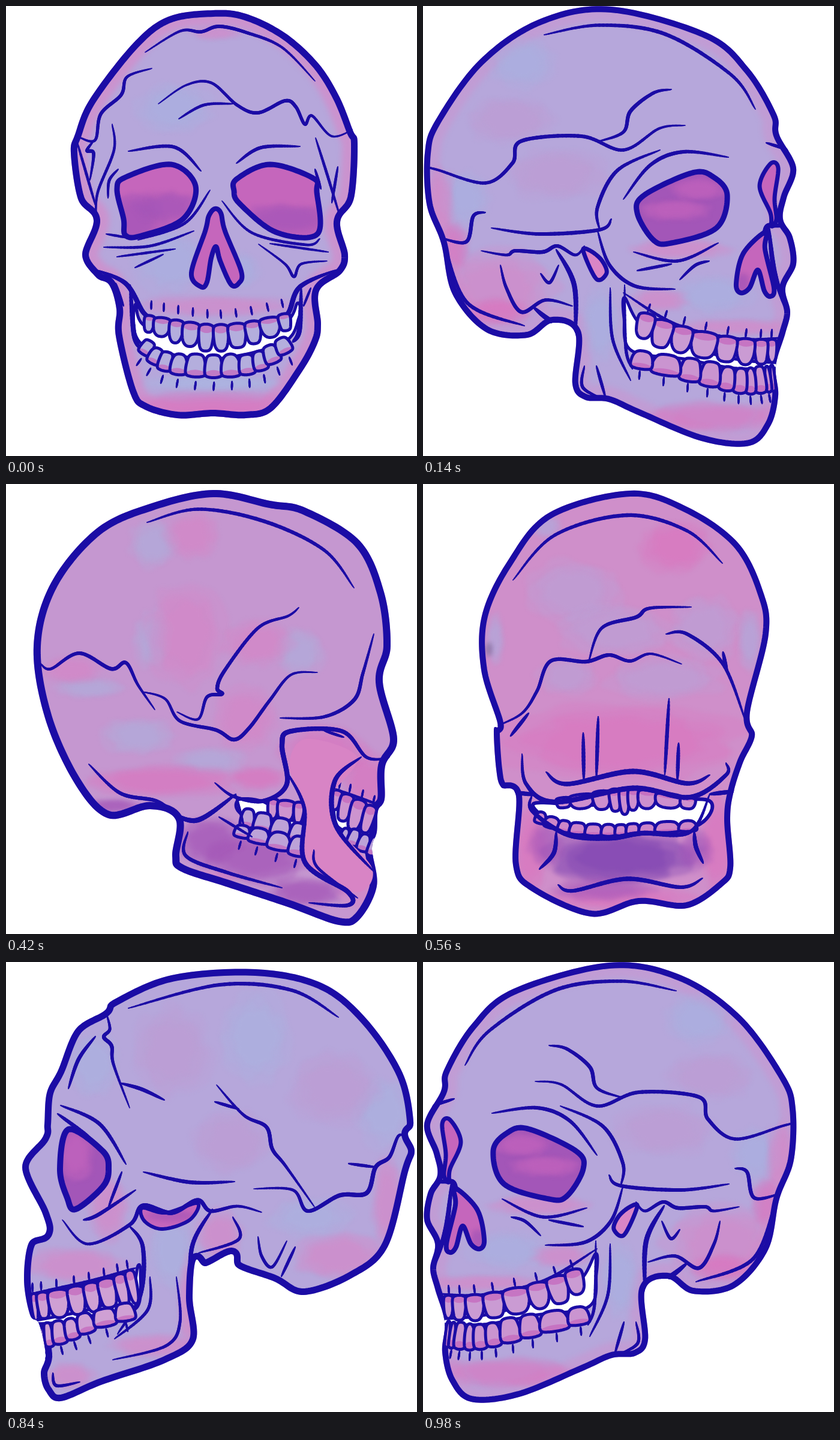
An HTML page with a canvas for the animation above (1120 ms loop, 685 by 750 pixels).

```html
<!DOCTYPE html>
<html>
<head>
<meta charset="utf-8">
<title>Turning skull</title>
<style>
html, body { margin: 0; width: 100%; height: 100%; overflow: hidden; background: #fff; }
canvas { display: block; }
</style>
</head>
<body>
<canvas id="stage" width="685" height="750"></canvas>
<script>
const W = 685, H = 750, STEP = 140;
const INK = '#1b0ca5', BLUE = '#a5b9e3', LILAC = '#b6a7db', MAUVE = '#c597d0', ORCHID = '#cf8fca',
  PINK = '#d985c6', HOT = '#df70bc', ROSE = '#c566bc', PURPLE = '#a356b8', DEEP = '#7941b2';
let g, seed = 7;

const rand = () => (seed = seed * 16807 % 2147483647) / 2147483647;

// Catmull-Rom samples through "x y x y ..."
function curve(s, closed) {
  const n = s.trim().split(/\s+/).map(Number), p = [], out = [];
  while (n.length) p.push(n.splice(0, 2));
  const len = p.length;
  const at = i => closed ? p[(i + len) % len] : p[Math.max(0, Math.min(len - 1, i))];
  for (let i = 0; i < (closed ? len : len - 1); i++) {
    const [a, b, c, d] = [at(i - 1), at(i), at(i + 1), at(i + 2)];
    for (let t = 0; t < 1; t += 1 / 16) {
      out.push([0, 1].map(j => b[j] + t / 2 * (c[j] - a[j] + t * (2 * a[j] - 5 * b[j] + 4 * c[j] - d[j]
        + t * (3 * (b[j] - c[j]) + d[j] - a[j])))));
    }
  }
  if (!closed) out.push(p[len - 1]);
  return out;
}

function blob(s) {
  const path = new Path2D();
  curve(s, true).forEach(p => path.lineTo(...p));
  path.closePath();
  return path;
}

function shape(fill, width, s, paint) {
  const path = blob(s);
  g.fillStyle = fill;
  g.fill(path);
  if (paint) { g.save(); g.clip(path); paint(path); g.restore(); }
  g.lineWidth = width;
  if (width) g.stroke(path);
}

// brush lines that thin out at both ends
function ink(width, ...lines) {
  for (const s of lines) {
    const c = curve(s);
    for (let i = 1; i < c.length; i++) {
      g.lineWidth = 1.3 + (width - 1) * Math.sin(Math.PI * (i - .5) / (c.length - 1)) ** .6;
      g.beginPath();
      g.moveTo(...c[i - 1]);
      g.lineTo(...c[i]);
      g.stroke();
    }
  }
}

// ragged translucent blots "x y rx ry"
function wash(color, alpha, ...blots) {
  g.save();
  g.fillStyle = color;
  g.filter = 'blur(3px)';
  g.globalAlpha = alpha / 2.6;
  for (const s of blots) {
    const [x, y, rx, ry] = s.split(' ').map(Number);
    for (let size = 1.1; size > .6; size -= .16) {
      let edge = '';
      for (let a = 0; a < 6.2; a += Math.PI / 11) {
        const r = size * (.86 + .28 * rand());
        edge += `${x + rx * r * Math.cos(a)} ${y + ry * r * Math.sin(a)} `;
      }
      g.fill(blob(edge));
    }
  }
  g.restore();
}

// a row of teeth standing on a gum curve; heights at start, middle and end
function row(color, count, heights, gum, { lower, bias = 1, tick } = {}) {
  const c = curve(gum), side = lower ? -1 : 1;
  const at = t => c[Math.round((c.length - 1) * t ** bias)];
  for (let i = 0; i < count; i++) {
    const a = at(i / count), b = at((i + 1) / count), t = (i + .5) / count * 2;
    const k = Math.min(1, Math.floor(t)), h = heights[k] + (heights[k + 1] - heights[k]) * (t - k);
    const w = Math.hypot(b[0] - a[0], b[1] - a[1]) + 1;
    g.save();
    g.translate((a[0] + b[0]) / 2, (a[1] + b[1]) / 2);
    g.rotate(Math.atan((b[1] - a[1]) / (b[0] - a[0])) * .6);
    g.scale(1, side);
    const tip = w * (.2 + .08 * rand()), tall = h * (.95 + .1 * rand()), r = w / 2;
    shape(color, 5, [-r, h * .15, -r / 2, 0, r / 2, 0, r, h * .15, r * .9, h * .7, tip, tall, -tip, tall, -r * .9, h * .7].join(' '), () => {
      g.fillStyle = ROSE;
      g.globalAlpha = .7;
      g.beginPath();
      g.ellipse(0, 0, r * 1.2, h * .32, 0, 0, 7);
      g.fill();
    });
    if (tick) ink(3.5, `0 ${-tick - 14} 1 ${-tick}`);
    g.restore();
  }
}

function rim(path, color, alpha) {
  g.save();
  g.filter = 'blur(5px)';
  g.strokeStyle = color;
  g.globalAlpha = alpha;
  g.lineWidth = 52;
  g.stroke(path);
  g.restore();
}

function pose(base, width, outline, paint, detail) {
  const c = document.createElement('canvas');
  c.width = W; c.height = H;
  g = c.getContext('2d');
  g.lineCap = g.lineJoin = 'round';
  g.strokeStyle = INK;
  shape(base, 0, outline, path => {
    paint(path);
    g.lineWidth = width * 2;
    g.stroke(path);
    detail();
  });
  return c;
}

const front = pose(LILAC, 11,
  `345 7 270 18 212 62 140 155 115 214 108 245 120 322 146 357 127 415 150 452 172 465 184 505 183 550 207 645
   230 672 285 687 345 684 400 687 445 674 495 607 520 560 525 530 522 475 560 445 570 415 557 360 580 320
   586 230 578 207 555 150 520 95 465 45 400 13`,
  path => {
    rim(path, PINK, .6);
    wash(BLUE, .4, '280 170 60 38', '275 425 55 50', '390 440 30 28');
    wash(PINK, .5, '350 500 125 16', '350 45 40 10');
    wash(HOT, .5, '345 666 140 22');
    wash(BLUE, .5, '345 628 110 12');
  },
  () => {
    shape('#fff', 5, '216 497 235 535 346 552 460 530 486 495 488 520 460 562 346 588 245 572 215 546');
    ink(8, '150 440 200 463 230 512 255 524', '550 440 490 468 470 512 445 522',
      '207 465 213 545 222 570', '492 470 489 540 478 560');
    row('#b4aedd', 10, [24, 46, 24], '232 515 285 524 346 532 410 526 472 511', { tick: 11 });
    row('#b4aedd', 11, [24, 38, 26], '222 572 250 602 290 615 346 619 400 615 440 601 477 570', { lower: true, tick: 8 });
    const shade = () => wash(PURPLE, .7, '215 355 45 42', '270 335 50 24', '470 355 75 24');
    shape(ROSE, 9, '200 285 275 264 316 300 295 355 225 383 199 382 196 355 185 305', shade);
    shape(ROSE, 9, '385 288 440 264 512 287 518 310 519 380 450 377 390 330 380 308', shade);
    shape(ROSE, 8, `348 338 358 345 365 375 392 442 388 462 375 464 357 425 350 401 342 420
      335 460 325 468 309 445 332 375 338 350`);
    ink(5.5, '232 77 290 42 325 43 355 34 400 44 460 69 515 125',
      '243 104 202 118 192 148 158 180 148 224 118 217', '145 226 135 241 146 246 140 290',
      '254 163 300 132 342 128 385 165 420 178 465 158 483 168 498 197 510 183 543 217 580 205',
      '204 242 280 235 325 275', '384 262 425 236 490 234');
    ink(4.5, '288 188 330 165 378 163', '177 197 180 240 153 310 150 352', '187 272 172 291 170 320',
      '516 220 535 280 557 352', '515 272 525 305', '553 268 543 328', '118 225 150 335',
      '220 390 298 362 340 307', '163 402 240 400 313 375', '360 325 410 378 500 398 523 388',
      '421 397 465 430 480 451 492 430 535 425');
    ink(4, '440 396 537 410', '167 380 208 387', '185 418 282 405', '215 436 262 414', '183 462 196 500', '508 470 496 500');
  });

const side = pose(LILAC, 11,
  `290 12 430 22 525 62 543 82 590 112 619 180 638 218 642 270 645 292 679 342 645 420 640 452 668 468 676 530
   666 588 651 603 640 655 648 685 640 715 615 732 545 704 440 668 390 632 395 560 390 498 373 507 330 487
   320 510 260 532 210 555 130 527 70 475 36 350 25 315 36 287 27 265 45 185 105 95 180 35`,
  () => {
    wash(BLUE, .38, '290 125 55 70', '75 250 45 55', '200 425 65 30', '560 170 40 50', '430 480 35 60');
    wash(MAUVE, .4, '160 210 70 55', '430 150 60 70', '330 300 60 50');
    wash(PINK, .6, '70 400 24 75', '150 490 75 38', '350 455 35 40', '400 570 18 80', '460 640 70 18',
      '535 410 30 50', '600 690 40 20', '590 505 80 28');
  },
  () => {
    shape('#fff', 5, '486 506 500 550 560 577 650 596 685 598 685 603 610 600 540 584 488 576 482 520');
    ink(7, '500 440 478 475 482 555 520 620', '362 412 396 475 398 570', '490 510 563 532 668 554');
    row('#cfa0d4', 8, [42, 46, 52], '665 554 590 541 530 525 494 512', { bias: 1.35, tick: 4 });
    row('#cfa0d4', 7, [38, 36, 26], '645 644 600 632 550 610 490 594', { lower: true, bias: 1.4, tick: 4 });
    shape(PURPLE, 10, '602 279 616 345 604 393 590 412 545 375 535 345 545 315',
      () => wash(ROSE, .8, '590 320 28 42'));
    shape(ROSE, 6, '387 402 440 418 479 410 475 432 445 445 400 430',
      () => wash(PURPLE, .5, '430 423 45 9'));
    ink(6, '152 92 230 47 350 38 502 77', '538 88 533 112 543 125 530 140 527 170 500 243',
      '515 202 480 212 442 230', '557 124 585 162 602 211', '506 337 550 270 615 239', '620 253 565 293',
      '490 380 552 421 577 430', '355 205 310 255 272 275 262 312 240 340 192 408', '325 366 400 367 477 350');
    ink(7, '38 292 52 290 67 325 90 342 105 385 150 389 203 415 228 380 293 378',
      '280 417 320 407 365 415 387 397 430 418 478 406 500 438 570 470 612 430');
    ink(5, '90 342 135 336', '358 233 318 245', '513 350 535 408', '224 475 247 524',
      '238 465 262 508 280 490 286 458', '328 425 318 462 385 485',
      '422 525 416 600 440 640 528 663', '466 525 470 580 525 628', '583 700 622 706 628 685');
  });

const rearSide = pose(MAUVE, 12,
  `345 10 440 28 500 40 590 95 630 180 641 270 628 330 652 425 632 470 631 525 620 545 618 580 610 608 618 670
   590 725 555 735 470 705 370 672 290 645 277 620 283 560 240 542 170 557 115 500 65 390 46 270 75 165
   150 75 240 33`,
  () => {
    wash(BLUE, .38, '245 100 38 38', '245 260 30 45', '490 280 38 38', '140 340 55 16', '340 460 55 20', '220 420 55 30');
    wash(PINK, .55, '310 85 42 36', '300 250 60 80', '420 265 55 35', '110 310 45 22', '400 390 50 50');
    wash(HOT, .5, '260 495 120 25', '530 450 70 45', '600 495 35 45', '520 560 28 70', '420 490 45 18');
    wash(PURPLE, .8, '180 536 40 10', '340 595 50 40', '420 625 80 38', '500 680 60 22');
    wash(PINK, .6, '330 654 60 8', '585 670 30 40');
  },
  () => {
    shape('#fff', 5, '388 526 430 530 465 558 496 562 497 574 460 576 392 550');
    shape('#fff', 4, '550 535 586 582 553 570');
    row('#cd94cf', 3, [32, 34, 32], '438 524 497 532');
    row('#cd94cf', 4, [24, 50, 46], '546 508 580 522 618 541', { tick: 4 });
    row('#bda2d8', 4, [30, 28, 30], '390 570 440 582 495 600', { lower: true });
    row('#bda2d8', 4, [18, 26, 34], '380 585 435 604 498 624', { lower: true, tick: 6 });
    row('#bda2d8', 4, [20, 28, 32], '556 592 612 622', { lower: true });
    shape('#d884c5', 0, '472 470 497 540 498 620 530 660 590 680 610 640 550 570 543 520 585 455 500 425');
    ink(8, '645 455 602 456 560 412 475 412 460 435 468 500 430 528 380 521 348 498',
      '467 478 497 540 498 630 570 680 570 702 505 698', '592 455 548 495 550 570 612 645',
      '275 548 320 560 383 517');
    ink(6, '235 64 320 42 430 62 530 110 580 173',
      '58 300 75 308 122 282 175 308 200 298 220 335 248 376',
      '226 346 265 358 290 395 350 410 380 426 405 407 440 360 475 318 519 314',
      '285 380 320 392 335 355 360 350 352 340 365 310 420 240 470 220 488 206',
      '613 250 595 315 580 360 530 388 457 390');
    ink(6, '138 467 190 515 250 528 280 548', '303 580 300 620 370 648 460 673');
    ink(4.5, '513 610 520 640 586 690', '530 411 563 422', '383 518 396 568', '355 555 410 588', '548 508 628 537');
  });

const rear = pose(ORCHID, 10,
  `345 11 440 38 525 98 567 180 576 250 545 380 553 420 533 465 517 516 512 560 517 640 500 670 440 707 360 700
   280 721 180 678 150 635 155 520 130 505 122 475 118 410 124 398 97 310 98 220 140 130 210 48`,
  () => {
    wash(LILAC, .5, '250 180 75 50', '320 245 90 40', '400 325 90 35', '240 320 45 30', '470 240 55 50');
    wash(BLUE, .4, '205 70 24 20', '120 260 14 40', '545 260 18 50');
    wash(HOT, .55, '420 105 55 40', '330 430 190 60', '180 610 26 70', '490 600 24 80', '330 690 120 18');
    wash(DEEP, .9, '330 622 120 42');
    wash(PURPLE, .6, '205 600 28 36', '300 675 80 18', '455 610 28 32');
    wash('#806a9c', .6, '110 276 6 12');
  },
  () => {
    shape('#fff', 6, '184 533 270 535 350 533 475 527 455 570 350 574 230 567');
    row('#cd8fce', 9, [14, 40, 16], '222 525 310 510 360 508 454 525');
    row('#cd86c8', 11, [18, 19, 16], '186 562 240 582 310 587 365 583 456 578', { lower: true });
    ink(8.5, '165 450 172 500 220 530 350 507 445 522 505 485 505 465',
      '205 480 240 500 350 479 440 499 478 485',
      '181 520 182 545 240 584 310 590 365 582 445 580 478 517');
    ink(6, '150 160 220 85 340 52 440 78 499 132',
      '122 404 165 382 190 345 213 295 272 296 310 285 345 295 380 283 431 300',
      '276 296 298 240 355 222 378 207 447 205', '405 250 440 250 500 300 538 396',
      '500 280 507 315', '176 382 146 420', '267 415 268 494', '292 388 289 488', '410 358 403 484', '426 432 424 494');
    ink(7, '225 668 250 678 340 658 430 672 466 657', '222 580 218 615 194 642',
      '452 580 455 605 467 632', '150 514 188 518', '520 512 478 517');
  });

const quarter = pose(LILAC, 10,
  `310 1 430 22 530 90 603 190 621 245 618 330 594 395 575 480 520 543 450 553 408 528 370 546 375 630 355 656
   315 660 265 682 160 725 80 733 45 700 32 650 36 600 20 545 12 510 20 470 2 430 8 385 24 355 18 320
   2 270 30 215 35 180 80 105 150 45`,
  path => {
    rim(path, PINK, .3);
    wash(BLUE, .4, '460 95 50 40', '555 320 40 40', '140 480 60 30', '330 530 28 60');
    wash(MAUVE, .4, '400 280 80 40', '480 190 70 35');
    wash(PINK, .6, '595 330 22 60', '500 470 90 60', '195 405 80 16', '100 535 90 12', '230 490 45 18');
    wash(HOT, .5, '570 400 22 36', '500 510 50 20', '140 685 110 24');
  },
  () => {
    shape('#fff', 5, '288 486 262 530 200 562 100 589 10 596 10 602 100 604 190 588 277 574 289 520');
    ink(6, '28 553 100 555 200 532 290 478');
    row('#ca9bd3', 8, [36, 42, 42], '35 556 100 554 190 535 262 508', { bias: 1.1, tick: 3 });
    row('#ca94d0', 10, [40, 42, 28], '36 641 90 646 170 628 278 600', { lower: true, bias: 1.25, tick: 4 });
    shape(PURPLE, 9, '140 285 175 278 255 315 267 345 240 390 210 395 135 370 117 315',
      () => wash(ROSE, .75, '165 305 45 18', '205 340 55 16'));
    shape(ROSE, 7, '32 270 45 263 63 300 45 345 43 367 35 355 38 320');
    shape(ROSE, 8, '52 376 90 412 102 462 95 478 80 470 66 440 55 475 45 484 39 470 54 405',
      () => wash(PURPLE, .8, '92 462 12 16'));
    shape(PINK, 7, '345 408 357 408 335 455 318 445 326 424');
    ink(6, '70 172 110 115 220 47 330 32 422 48', '210 139 240 145 278 175 290 210 332 226',
      '187 199 230 204 290 240 360 217 460 225 475 262 520 295 600 273 620 268',
      '115 252 190 243 245 265 290 322', '229 240 300 274 333 335 330 372', '310 355 330 373 430 380 510 370',
      '355 400 370 415 400 400 425 410 470 408 485 415 527 408');
    ink(6, '520 344 540 350 552 393 596 386', '333 375 313 432 270 467 204 472',
      '375 500 420 490 460 510 485 470 495 432', '587 400 550 495 455 533');
    ink(8, '402 406 372 465 370 550', '368 545 412 524 440 502', '24 367 48 366 56 378', '48 366 39 440 22 500');
    ink(5, '288 465 286 570 275 605', '312 470 308 555 278 624', '132 395 200 425 273 410', '147 425 170 432 196 456',
      '210 430 267 441', '398 432 413 461 428 446', '355 600 358 635 325 655', '335 600 320 652', '14 240 52 228');
  });

const frames = [[front], [quarter, 624], [side], [rearSide], [rear], [rearSide, 697], [side, 706], [quarter]];
const stage = document.getElementById('stage').getContext('2d');

function draw() {
  const [image, flip] = frames[Math.floor(performance.now() / STEP) % frames.length];
  stage.setTransform(1, 0, 0, 1, 0, 0);
  stage.fillStyle = '#fff';
  stage.fillRect(0, 0, W, H);
  if (flip) stage.setTransform(-1, 0, 0, 1, flip, 0);
  stage.drawImage(image, 0, 0);
  requestAnimationFrame(draw);
}
draw();
</script>
</body>
</html>
```
